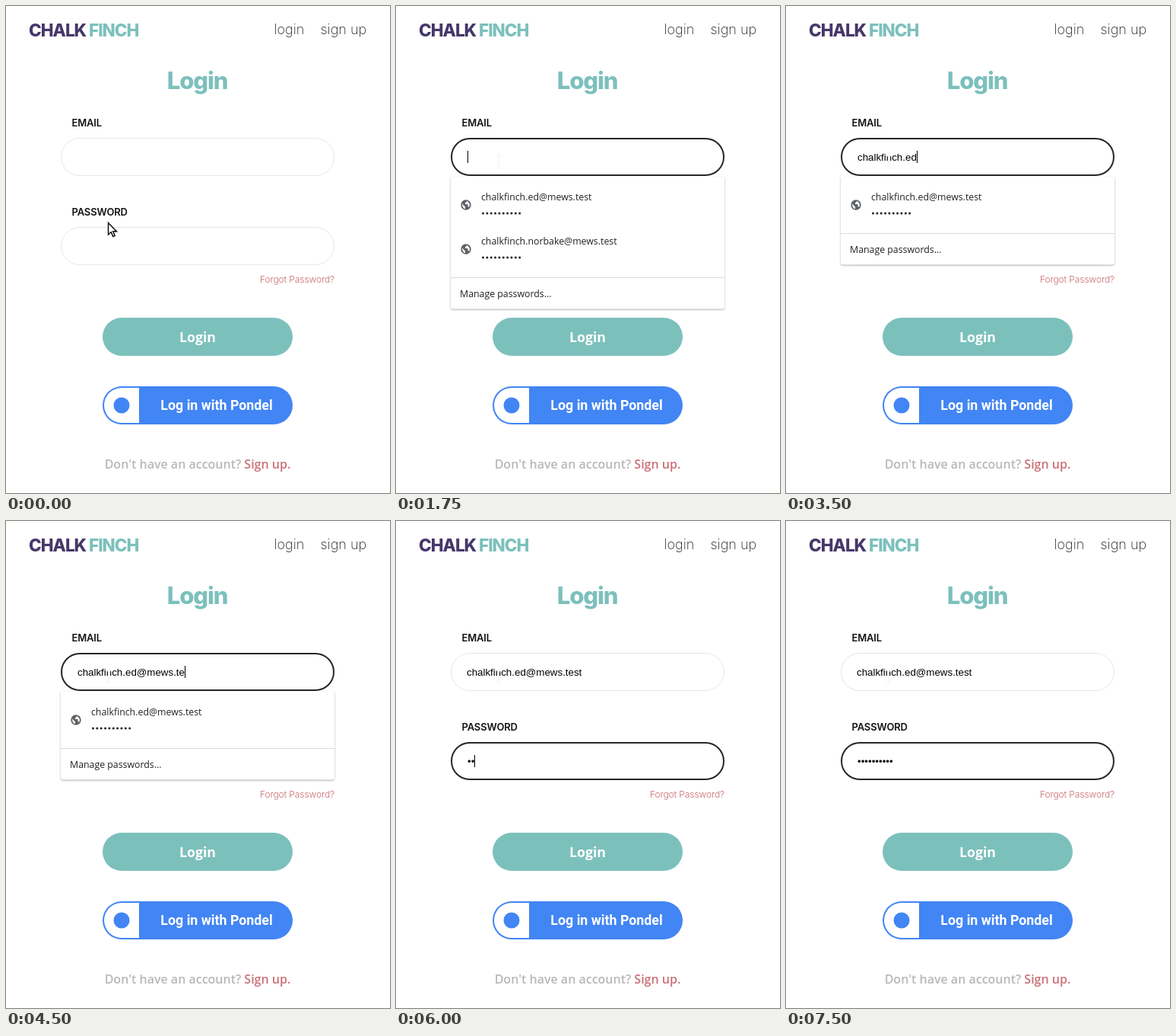
Write an HTML page that moves like this. It is 505 by 639 pixels and loops after 8 s.

```html
<!DOCTYPE html>
<html lang="en">
<head>
<meta charset="utf-8">
<title>Login form</title>
<style>
  html, body { margin: 0; width: 100%; height: 100%; overflow: hidden; background: #fff; }
  svg { display: block; width: 505px; height: 639px; }
  text { white-space: pre; }
  .geo { font-family: Inter, sans-serif; }
  .brand { font-size: 22.5px; font-weight: 800; letter-spacing: -1px; }
  .title { font-size: 31px; font-weight: 800; letter-spacing: -1.1px; fill: #7cc0bc; }
  .nav { font-size: 18px; font-weight: 200; fill: #222; }
  .label { font-size: 13px; font-weight: 600; letter-spacing: -.15px; fill: #111; }
  .forgot { font-size: 12px; font-weight: 300; letter-spacing: -.1px; fill: #c8696e; }
  .open { font-family: "Open Sans", "Noto Sans", sans-serif; }
  .submit { font-size: 17.7px; font-weight: 700; fill: #fff; }
  .partner { font: 700 17.8px Roboto, sans-serif; fill: #fff; }
  .foot { font-size: 16px; font-weight: 600; fill: #b9b7b8; }
  .input { font: 13.333px "Liberation Sans", Arial, sans-serif; fill: #000; }
  .field { fill: #fff; stroke: #e6e6e6; stroke-width: 1; }
  .field.focus { stroke: #282628; stroke-width: 2; }
  .popup { filter: drop-shadow(0 1px 1.2px rgba(0, 0, 0, .32)); }
  .popup text { font-size: 12.34px; fill: #222; }
  .dots { stroke: #222; stroke-width: 3; stroke-linecap: round; stroke-dasharray: 0 5.35; }
</style>
</head>
<body>
<svg viewBox="0 0 505 639">
  <defs>
    <g id="globe">
      <circle r="6.7" fill="#5f6368"/>
      <path d="M-5 -1.5 L-1 2.5 V5.3 Q-5 4 -5 -1.5 Z M1 -5.2 Q1 -3 -1 -2.8 V-1 H2.5 V1.8 Q4 2 4 3.5 Q6.5 -2 1 -5.2 Z" fill="#fff"/>
    </g>
    <path id="bar" d="M-2.5 -7.5 H2.5 M0 -7.5 V7.5 M-2.5 7.5 H2.5"/>
  </defs>

  <g class="geo">
    <text class="brand" x="30" y="40" fill="#46386a">CHALK</text>
    <text class="brand" x="109" y="40" fill="#7cc0bc">FINCH</text>
    <text class="nav" x="352.5" y="37">login</text>
    <text class="nav" x="413.5" y="37">sign up</text>
    <text class="title" x="251.5" y="108.5" text-anchor="middle">Login</text>
    <text class="label" x="86.5" y="158">EMAIL</text>
    <text class="label" x="86.5" y="275">PASSWORD</text>
    <text class="forgot" x="432" y="363" text-anchor="end">Forgot Password?</text>
  </g>

  <rect class="field" id="emailBox"/>
  <rect class="field" id="passBox"/>
  <text class="input" id="email" y="203"></text>
  <text class="input" id="pass" x="94" y="320"></text>

  <rect x="127" y="409" width="250" height="50" rx="25" fill="#7cc0bc"/>
  <text class="open submit" x="252" y="441" text-anchor="middle">Login</text>

  <rect x="127" y="499" width="250" height="50" rx="25" fill="#4285f4"/>
  <path d="M175 501 H152 A23 23 0 0 0 152 547 H175 Z" fill="#fff"/>
  <circle cx="152" cy="524" r="10.5" fill="#4285f4"/>
  <text class="partner" x="277" y="530" text-anchor="middle">Log in with Pondel</text>

  <text class="open foot" x="252" y="607" text-anchor="middle">Don't have an account? <tspan fill="#ca7076">Sign up.</tspan></text>

  <g class="popup open" id="popup">
    <path id="sheet" fill="#fff"/>
    <use href="#globe" x="92" y="261"/>
    <text x="112" y="255">chalkfinch.ed@mews.test</text>
    <path class="dots" d="M114.5 272 h49"/>
    <g id="second">
      <use href="#globe" x="92" y="319"/>
      <text x="112" y="313">chalkfinch.norbake@mews.test</text>
      <path class="dots" d="M114.5 330 h49"/>
    </g>
    <g id="manage">
      <path d="M72 356.5 H432" stroke="#dadada"/>
      <text x="84" y="382">Manage passwords...</text>
    </g>
  </g>

  <rect id="caret" width="1" height="16"/>
  <path id="arrow" d="M.5 .5 V16 L4.2 12.6 L6.8 18.5 L9.2 17.4 L6.7 11.7 H11.5 Z" fill="#fff" stroke="#000" stroke-width="1.4"/>
  <g id="beam">
    <use href="#bar" stroke="#ebebeb" stroke-width="2"/>
    <use href="#bar" stroke="#fff" stroke-width="1.2"/>
  </g>
</svg>

<script>
  const LOOP = 8000, STEP = 250;
  const ADDRESS = "chalkfinch.ed@mews.test";
  const $ = id => document.getElementById(id);
  const show = (id, on) => $(id).style.display = on ? "" : "none";
  const set = (id, attrs) => {
    for (const key in attrs) $(id).setAttribute(key, attrs[key]);
  };
  const clamp = (n, max) => Math.max(0, Math.min(max, n));

  function drawField(id, top, focus) {
    const inset = focus ? 1 : .5;
    $(id).classList.toggle("focus", focus);
    set(id, { x: 72 + inset, y: top + inset, width: 360 - 2 * inset,
              height: 50 - 2 * inset, rx: 25 - inset });
  }

  function drawPopup(t, typed) {
    const both = typed < 12;
    const bottom = both ? 397.5 : 339.5;
    show("popup", t >= 750 && t < 5000);
    show("second", both);
    set("sheet", { d: `M72 224 H432 V${bottom - 3} q0 3 -3 3 H75 q-3 0 -3 -3 Z` });
    set("manage", { transform: `translate(0 ${both ? 0 : -58})` });
  }

  function drawPointer(t) {
    show("arrow", t < 500);
    show("beam", t >= 500);
    set("arrow", { transform: t < 250 ? "translate(134 284)" : "translate(136 238)" });
    set("beam", { transform: `translate(${t < 1750 ? 137 : 135} 204)` });
  }

  function render(time) {
    const t = Math.floor(time / STEP) * STEP;
    const onEmail = t >= 750 && t < 5000, onPass = t >= 5000;

    // two keystrokes per step
    const typed = clamp((t - 2000) / STEP * 2 + 1, ADDRESS.length);
    const secret = t < 5750 ? 0 : t < 6000 ? 1 : clamp((t - 5750) / STEP * 2, 10);

    drawField("emailBox", 173, onEmail);
    drawField("passBox", 290, onPass);
    $("email").textContent = ADDRESS.slice(0, typed);
    set("email", { x: onPass ? 93 : 94 });
    $("pass").textContent = "•".repeat(secret);

    const blinkOff = (t >= 1250 && t < 1750) || (t >= 5500 && t < 5750) || t >= 7500;
    const active = onPass ? "pass" : "email";
    const count = onPass ? secret : typed;
    const width = count ? $(active).getComputedTextLength() : 0;
    show("caret", (onEmail || onPass) && !blinkOff);
    set("caret", { x: Math.round(94 + width), y: onPass ? 307 : 190 });

    drawPopup(t, typed);
    drawPointer(t);
  }

  const start = performance.now();
  function tick() {
    render((performance.now() - start) % LOOP);
    requestAnimationFrame(tick);
  }
  tick();
</script>
</body>
</html>
```
